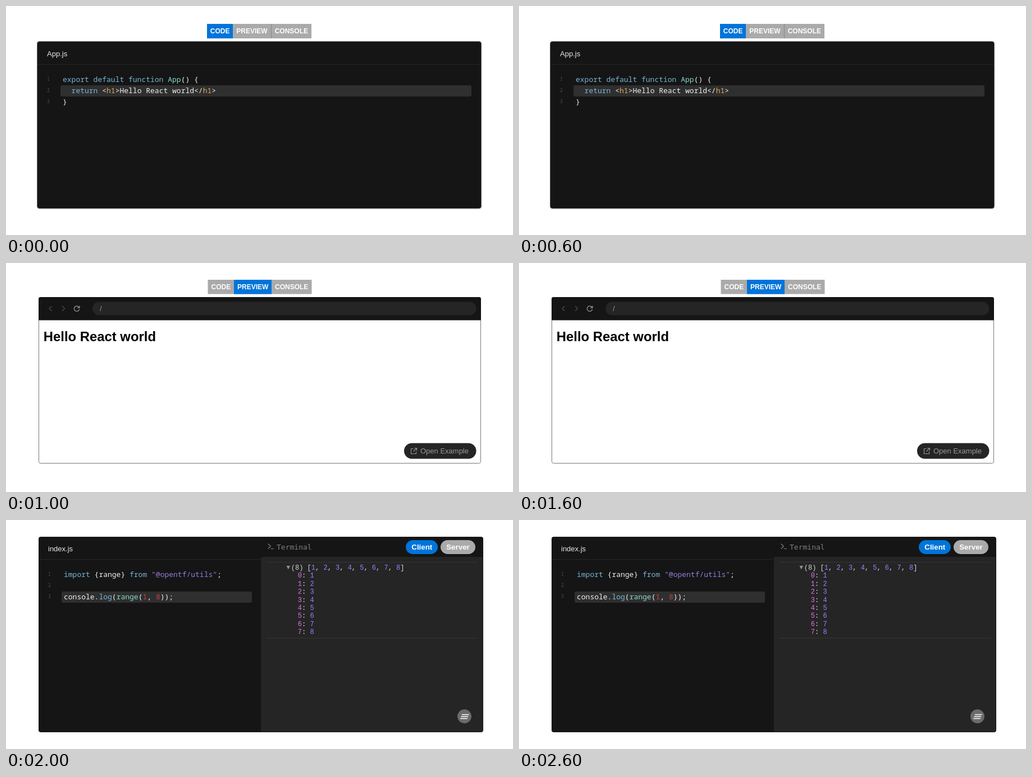
An HTML page that plays this animation: 903x410 px, repeating every 3000 ms.

```html
<!DOCTYPE html>
<html lang="en">
<head>
<meta charset="utf-8">
<title>Code playground</title>
<style>
  html, body { margin: 0; width: 100%; height: 100%; overflow: hidden; background: #fff; }
  svg { display: block; width: 903px; height: 410px; }
  text { white-space: pre; font: 13px "Liberation Sans", Arial, sans-serif; }

  .scene { opacity: 0; animation: show 3s step-end infinite; }
  .preview { animation-delay: -2s; }
  .console { animation-delay: -1s; }
  @keyframes show {
    0% { opacity: 1; }
    33.3333%, 100% { opacity: 0; }
  }

  .tabs text { font-size: 12px; font-weight: bold; fill: #fff; }
  .pill { font-size: 13.333px; font-weight: bold; fill: #fff; text-anchor: middle; }
  .on { fill: #0074d9; }
  .off { fill: #aaa; }
  .dark { fill: #151515; }
  .soft { fill: #252525; }
  .line { fill: #2f2f2f; }
  .file { fill: #e8e8e8; }
  .muted { fill: #999; }

  .code text { font: 13px "Noto Sans Mono", monospace; fill: #f0f0f0; }
  .code .num { font-size: 8px; fill: #4d4d4d; }
  .kw { fill: #77b7d7; }
  .def { fill: #86d9ca; }
  .tag { fill: #dfab5c; }
  .str { fill: #977cdc; }
  .lit { fill: #c64640; }

  .term { font: 13px "DejaVu Sans Mono", monospace; fill: #808080; }
  .log text { font: 12px "Liberation Mono", "Courier New", monospace; fill: #d5d5d5; }
  .key { fill: #e36eec; }
  .val { fill: #9980ff; }
  .icon { fill: none; stroke-linecap: round; stroke-linejoin: round; }
</style>
</head>
<body>
<svg viewBox="0 0 903 410" xmlns="http://www.w3.org/2000/svg">

  <g class="scene editor">
    <g class="tabs">
      <rect class="on" x="358" y="32" width="46" height="26"/>
      <rect class="off" x="404" y="32" width="140" height="26"/>
      <rect x="472" y="32" width="1" height="26" fill="#888"/>
      <text x="363.8" y="49">CODE</text>
      <text x="410.3" y="49">PREVIEW</text>
      <text x="478.7" y="49">CONSOLE</text>
    </g>
    <rect class="dark" x="55.5" y="63.5" width="791" height="299" rx="4" stroke="#666"/>
    <rect class="soft" x="56" y="104" width="790" height="1"/>
    <text class="file" x="73" y="90">App.js</text>
    <rect class="line" x="97" y="142" width="732" height="20" rx="3"/>
    <g class="code">
      <text class="num" x="73" y="134">1</text>
      <text class="num" x="73" y="154">2</text>
      <text class="num" x="73" y="174">3</text>
      <text x="101" y="136"><tspan class="kw">export default function</tspan> <tspan class="def">App</tspan>() {</text>
      <text x="101" y="156">  <tspan class="kw">return</tspan> &lt;<tspan class="tag">h1</tspan>&gt;Hello React world&lt;/<tspan class="tag">h1</tspan>&gt;</text>
      <text x="101" y="176">}</text>
    </g>
  </g>

  <g class="scene preview">
    <g class="tabs">
      <rect class="off" x="359.5" y="30" width="185" height="25.6"/>
      <rect class="on" x="406" y="30" width="67" height="25.6"/>
      <text x="365.5" y="47">CODE</text>
      <text x="412" y="47">PREVIEW</text>
      <text x="479" y="47">CONSOLE</text>
    </g>
    <rect x="58.5" y="61.5" width="787" height="297" rx="3" fill="#fff" stroke="#777"/>
    <path class="dark" d="M58 102.5V64.500q0-3.500 3.500-3.500H842.500q3.500 0 3.500 3.500V102.500z"/>
    <g class="icon" stroke="#4d4d4d" stroke-width="1.2">
      <path d="M81 77.500l-4 4 4 4M100.500 77.500l4 4-4 4"/>
      <path stroke="#999" d="M130.300 79.800A4.700 4.700 0 1 0 130.600 83M131 77v3.200h-3.400"/>
    </g>
    <rect class="soft" x="154" y="69.500" width="683.500" height="24" rx="12"/>
    <text class="muted" x="167" y="86">/</text>
    <text x="66.800" y="140" style="font-size:23.870px;font-weight:bold">Hello React world</text>
    <rect class="soft" x="709" y="322.500" width="128.500" height="28" rx="14"/>
    <path class="icon" stroke="#999" stroke-width="1.100" d="M725 332.500h-3.500v9h9V338M727.500 331.500h4v4M731.500 331.500l-5.500 5.500"/>
    <text class="muted" x="738" y="341">Open Example</text>
  </g>

  <g class="scene console">
    <rect class="dark" x="58" y="30" width="792" height="350" rx="4"/>
    <rect class="soft" x="454" y="66" width="395" height="313" rx="2"/>
    <rect class="soft" x="59" y="70" width="395" height="1"/>
    <text class="file" x="75" y="56">index.js</text>
    <rect class="line" x="99" y="128" width="339" height="20" rx="3"/>
    <g class="code">
      <text class="num" x="75" y="100">1</text>
      <text class="num" x="75" y="120">2</text>
      <text class="num" x="75" y="140">3</text>
      <text x="103" y="102"><tspan class="kw">import</tspan> {range} <tspan class="kw">from</tspan> <tspan class="str">"@opentf/utils"</tspan>;</text>
      <text x="103" y="142">console.<tspan class="kw">log</tspan>(<tspan class="def">range</tspan>(<tspan class="lit">1</tspan>, <tspan class="lit">8</tspan>));</text>
    </g>

    <path class="icon" stroke="#808080" stroke-width="1.200" d="M467 43l4.500 4-4.500 4M472 51.500h4.500"/>
    <text class="term" x="482" y="53">Terminal</text>
    <rect class="on" x="712" y="36" width="57" height="25" rx="12.500"/>
    <text class="pill" x="740.800" y="53">Client</text>
    <rect class="off" x="774" y="36" width="62" height="25" rx="12.500"/>
    <text class="pill" x="805" y="53">Server</text>

    <path d="M463 75.500H840M463 211.500H840" stroke="#353535"/>
    <path d="M499.500 82h6.500l-3.250 6.500z" fill="#919191"/>
    <g class="log" id="log"></g>

    <circle cx="816.500" cy="351.500" r="12.500" fill="#6b6b6b"/>
    <path class="icon" stroke="#fff" stroke-width="1.600" d="M812.500 348.500h11.500M811 352h11.500M809.800 355.500h11.500"/>
  </g>
</svg>

<script>
  const span = (cls, s) => `<tspan class="${cls}">${s}</tspan>`;
  const row = (x, i, s) => `<text x="${x}" y="${(89 + 14.4 * i).toFixed(1)}">${s}</text>`;
  const list = Array.from({ length: 8 }, (_, i) => i + 1);

  document.getElementById("log").innerHTML =
    row(507.8, 0, `(8) [${list.map(n => span("val", n)).join(", ")}]`) +
    list.map((n, i) => row(519.8, n, `${span("key", i)}: ${span("val", n)}`)).join("");
</script>
</body>
</html>
```
